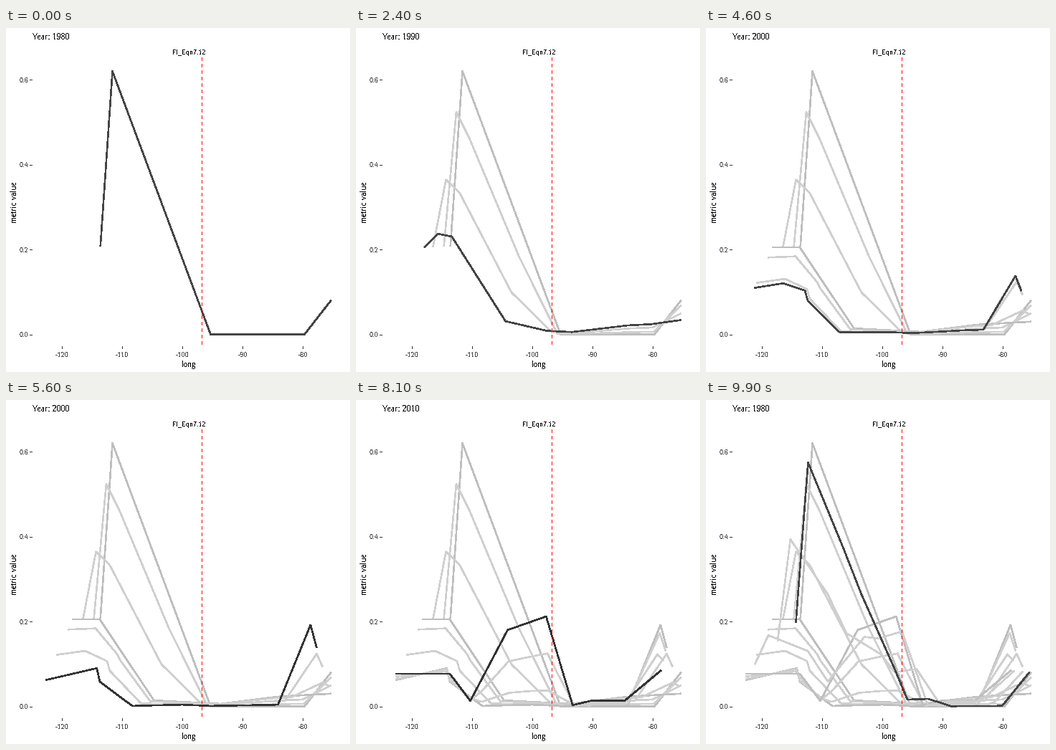
Animation of 480x480 px, one loop 10 s. Source, as a matplotlib script:

```python
import numpy as np
import matplotlib.pyplot as plt
from matplotlib.animation import FuncAnimation

SIZE, DPI = 480, 72          # at 72 dpi one point is one pixel
FRAMES, INTERVAL = 100, 100
STATE = 25                   # frames from one year to the next
TRAIL_STEP = 5
MOVE_STARTS = [12, 38, 63, 88]

plt.rcParams["font.family"] = "Liberation Serif"
plt.rcParams["text.hinting"] = "native"
plt.rcParams["toolbar"] = "None"

# Corners of each year's curve as (longitude, value).
CURVES = {
    1980: [(-113.6, .208), (-111.6, .62), (-95.3, 0), (-79.7, 0),
           (-75.3, .08)],
    1990: [(-118.3, .205), (-113.7, .205), (-104.7, .014), (-93.6, .006),
           (-84.1, .023), (-75.3, .03)],
    2000: [(-122.7, .062), (-114.2, .09), (-113.7, .058), (-108.3, .001),
           (-100, .004), (-95.4, .001), (-84.1, .004), (-78.7, .192),
           (-77.7, .139)],
    2010: [(-122.7, .077), (-113.7, .077), (-110.3, .013), (-104.1, .18),
           (-97.7, .212), (-93.3, .003), (-90, .014), (-84.6, .014),
           (-78.6, .085)],
}
YEARS = list(CURVES)


def px(long):
    return 78 + 8.4 * (long + 120)


def py(value):
    return 427.5 - 592 * value


def progress(frame):
    """Index of the latest transition and how far it has come."""
    k = max([i for i, s in enumerate(MOVE_STARTS) if frame > s], default=0)
    start, end = MOVE_STARTS[k], (k + 1) * STATE
    return k, min(max((frame - start) / (end - start), 0), 1)


def spread(x):
    """Longitudes as fractions of the curve's extent."""
    return (x - x[0]) / (x[-1] - x[0])


def pose(frame):
    """Blend two curves, pairing points at equal fractions of their extent."""
    k, t = progress(frame)
    ends = [np.array(CURVES[YEARS[i % 4]], float).T for i in (k, k + 1)]
    u = np.union1d(*[spread(x) for x, _ in ends])
    a, b = [np.array([x[0] + u * (x[-1] - x[0]), np.interp(u, spread(x), y)])
            for x, y in ends]
    x, y = a + (b - a) * t
    return px(x), py(y)


def resting(frame):
    return progress(frame)[1] in (0, 1)


fig = plt.figure(figsize=(SIZE / DPI, SIZE / DPI), dpi=DPI, facecolor="white")
ax = fig.add_axes([0, 0, 1, 1])
ax.set_xlim(0, SIZE)
ax.set_ylim(SIZE, 0)
ax.axis("off")


def label(x, y, text, size, color="black", **kw):
    return ax.text(x, y, text, fontsize=size, color=color,
                   antialiased=False, **kw)


def stroke(xs, ys, color, width=1, **kw):
    return ax.plot(xs, ys, color=color, lw=width, antialiased=False,
                   solid_capstyle="butt", solid_joinstyle="round", **kw)[0]


# Axis ticks and labels
for long in range(-120, -79, 10):
    stroke([px(long)] * 2, [444, 447], "#333333")
    label(px(long), 459, str(long), 10.3, "#4d4d4d", ha="center")
for value in np.arange(4) / 5:
    stroke([33, 36], [py(value)] * 2, "#333333")
    label(31.5, py(value) + 3.5, f"{value:.1f}", 10, "#4d4d4d", ha="right")

label(255, 473, "long", 11.6, ha="center")
label(12, 243, "metric value", 11.6, rotation=90, ha="center", va="center")
label(255, 37, "FI_Eqn7.12", 10, ha="center")
title = label(36, 16, "", 12)

stroke([273, 273], [41, 445], "#ff0000", dashes=(4, 4),
       dash_capstyle="butt", zorder=6)

# Trail left behind by the curve
trail = []
for s in range(0, FRAMES, TRAIL_STEP):
    shade = "#bebebe" if resting(s) else "#cfcfcf"
    trail.append((s, stroke(*pose(s), shade, 1.6, zorder=3)))

line = stroke([], [], "#444444", 1.6, zorder=5)


def draw(frame):
    k, t = progress(frame)
    title.set_text(f"Year: {YEARS[(k + (t > 0.5)) % 4]}")
    line.set_data(*pose(frame))
    settled = resting(frame) and frame % STATE > TRAIL_STEP
    line.set_color("#333333" if settled else "#444444")
    for s, mark in trail:
        mark.set_visible(s < frame)
    return [title, line] + [mark for _, mark in trail]


anim = FuncAnimation(fig, draw, frames=FRAMES, interval=INTERVAL,
                     repeat=True, repeat_delay=0, blit=False)
plt.show()
```
